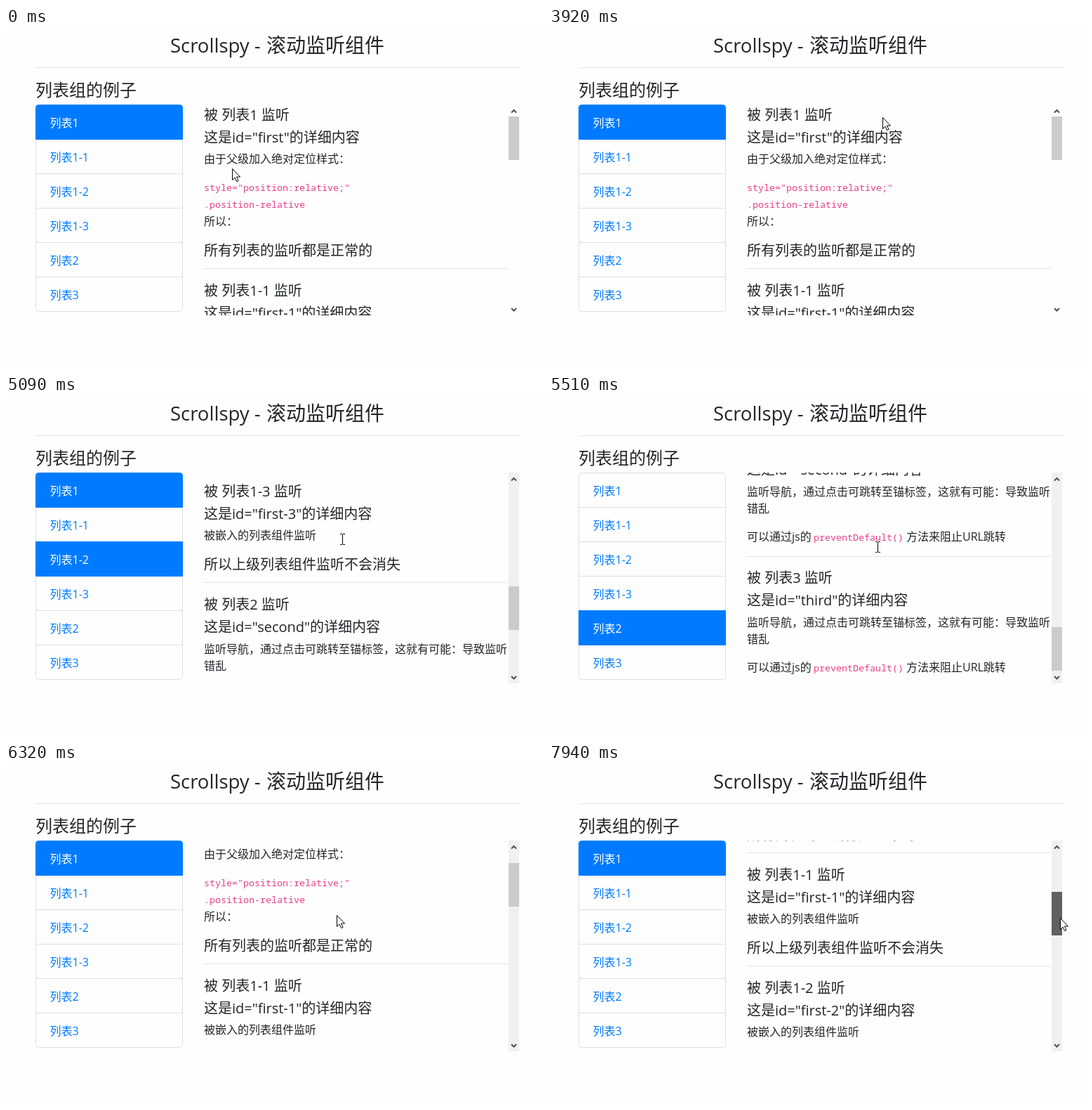
An HTML page that plays this animation: 765 px wide and 484 px high, repeating every 8 s.

```html
<!DOCTYPE html>
<html lang="zh-CN">
<head>
<meta charset="utf-8">
<title>Scrollspy</title>
<style>
html, body { margin: 0; width: 100%; height: 100%; overflow: hidden; background: #fefefe; }
svg { display: block; }
text { font-family: "Open Sans", "Noto Sans CJK SC", "Noto Sans CJK", sans-serif; fill: #212529; white-space: pre; }
.code { font-family: "Noto Sans Mono", monospace; fill: #e83e8c; }
.item path { fill: #fefefe; stroke: #dfdfdf; }
.item text { fill: #007bff; }
.item.active path { fill: #007bff; stroke: #007bff; }
.item.active text { fill: #fff; }
.rule { fill: #e4e4e4; }
.chevron { fill: none; stroke: #505050; stroke-width: 2; }
</style>
</head>
<body>
<svg id="stage" width="765" height="484" viewBox="0 0 765 484">
  <clipPath id="view"><rect x="281" y="109" width="435" height="300"/></clipPath>
  <rect class="rule" x="42" y="56" width="690" height="1"/>
  <g id="list"></g>
  <g clip-path="url(#view)"><g id="content"></g></g>
  <rect id="track" x="716" y="109" width="15" height="300"/>
  <path class="chevron" d="M720 120.500l3.500-3.500 3.500 3.500M720 399l3.500 3.500 3.500-3.500"/>
  <rect id="thumb" x="716" width="15" height="62"/>
  <path id="arrow" fill="#fff" stroke="#000" d="M.5.500V16.500L4 13l2.500 5.500 2.500-1-2.500-5.500h5z"/>
  <path id="beam" fill="none" stroke="#000" d="M-3-7.500h3m1 0h3M-3 7.500h3m1 0h3M.5-7v14"/>
</svg>
<script>
const $ = id => document.getElementById(id);
const list = $('list'), content = $('content');
const MAX_SCROLL = 787, TRAVEL = 204, GRAB_Y = 163;

function add(parent, tag, attrs) {
  const node = document.createElementNS('http://www.w3.org/2000/svg', tag);
  for (const key in attrs) node.setAttribute(key, attrs[key]);
  return parent.appendChild(node);
}

function write(parent, x, y, size, str) {
  add(parent, 'text', { x, y, 'font-size': size }).textContent = str;
}

function writeCode(x, y, str) {
  add(content, 'text', { x, y, 'font-size': 13.33, class: 'code' }).textContent = str;
}

write($('stage'), 234, 35, 27.5, 'Scrollspy -');
write($('stage'), 371, 35, 28, '滚动监听组件');
write($('stage'), 42, 97, 24, '列表组的例子');

// Navigation list
const names = ['1', '1-1', '1-2', '1-3', '2', '3'];
const items = names.map((name, i) => {
  const item = add(list, 'g', { class: 'item' });
  const y = 109.5 + 49 * i, a = i ? 0 : 4, b = i === 3 || i === 5 ? 4 : 0;
  add(item, 'path', {
    d: `M42.5 ${y + a}q0 ${-a} ${a} ${-a}H${251.5 - a}q${a} 0 ${a} ${a}` +
       `V${y + 49 - b}q0 ${b} ${-b} ${b}H${42.5 + b}q${-b} 0 ${-b} ${-b}z`
  });
  write(item, 62.5, 141 + 49 * i, 16, '列表' + name);
  return item;
});

// Scrolling sections, placed by the baseline of their heading
const ids = ['first', 'first-1', 'first-2', 'first-3', 'second', 'third'];
const baselines = [131, 381, 542, 703, 864, 1050];
baselines.forEach((y, i) => {
  const line = (dy, size, str, x = 282) => write(content, x, y + dy, size, str);
  const rule = dy => add(content, 'rect', { class: 'rule', x: 281, y: y + dy, width: 434, height: 1 });
  line(0, 20, `被 列表${names[i]} 监听`);
  line(32, 20, `这是id="${ids[i]}"的详细内容`);
  if (i === 0) {
    line(61, 16, '由于父级加入绝对定位样式：');
    writeCode(282, y + 101, 'style="position:relative;"');
    writeCode(282, y + 125, '.position-relative');
    line(150, 16, '所以：');
    line(193, 20, '所有列表的监听都是正常的');
    rule(211);
  } else if (i < 4) {
    line(61, 16, '被嵌入的列表组件监听');
    line(104, 20, '所以上级列表组件监听不会消失');
    rule(122);
  } else {
    line(62, 16, '监听导航，通过点击可跳转至锚标签，这就有可能：导致监听');
    line(86, 16, '错乱');
    line(126, 16, '可以通过js的');
    writeCode(377, y + 126, 'preventDefault()');
    line(126, 16, '方法来阻止URL跳转', 509);
    if (i === 4) rule(148);
  }
});

// [time, pointer, x, y, scroll]; while dragging, the pointer sets the scroll
const steps = [
  [0, 'arrow', 322, 200, 0],
  [120, 'arrow', 361, 88, 0],
  [270, 'none', 0, 0, 0],
  [3920, 'arrow', 475, 127, 0],
  [4450, 'arrow', 479, 131, 0],
  [4570, 'arrow', 482, 134, 0],
  [4720, 'beam', 488, 143, 37],
  [4840, 'beam', 489, 148, 137],
  [4970, 'beam', 486, 172, 330],
  [5090, 'beam', 479, 204, 560],
  [5210, 'beam', 473, 222, 730],
  [5350, 'beam', 466, 215, 730],
  [5510, 'beam', 468, 215, 784],
  [5650, 'arrow', 467, 215, 787],
  [5800, 'arrow', 468, 215, 787],
  [5950, 'arrow', 470, 215, 787],
  [6200, 'arrow', 471, 215, 341],
  [6320, 'arrow', 471, 215, 58],
  [6480, 'arrow', 471, 215, 0],
  [6740, 'arrow', 530, 207, 0],
  [6860, 'arrow', 630, 190, 0],
  [6980, 'arrow', 706, 178, 0],
  [7100, 'hover', 732, 173, 0],
  [7250, 'hover', 731, 167, 0],
  [7380, 'drag', 730, GRAB_Y],
  [7520, 'drag', 728, 200],
  [7670, 'drag', 728, 210],
  [7940, 'drag', 728, 219]
];

function activeItems(scroll) {
  if (scroll >= MAX_SCROLL) return [5];
  const current = baselines.filter(y => y - baselines[0] <= scroll + 10).length - 1;
  return current > 0 && current < 4 ? [0, current] : [current];
}

function render([time, pointer, x, y, wheel]) {
  const scroll = wheel ?? (y - GRAB_Y) * MAX_SCROLL / TRAVEL;
  content.setAttribute('transform', `translate(0 ${-Math.round(scroll)})`);
  $('thumb').setAttribute('y', 126 + Math.round(scroll * TRAVEL / MAX_SCROLL));
  $('thumb').setAttribute('fill', { hover: '#a8a8a8', drag: '#606060' }[pointer] || '#cbcbcb');
  $('track').setAttribute('fill', time < 4720 ? '#fefefe' : '#f0f0f0');

  const active = activeItems(scroll);
  items.forEach((item, i) => item.classList.toggle('active', active.includes(i)));
  list.append(...items, ...active.map(i => items[i]));

  const shape = pointer === 'hover' || pointer === 'drag' ? 'arrow' : pointer;
  for (const id of ['arrow', 'beam']) {
    $(id).setAttribute('transform', `translate(${x} ${y})`);
    $(id).style.display = id === shape ? '' : 'none';
  }
}

let shown;
function frame() {
  const t = performance.now() % 8000;
  const step = steps.findLast(s => s[0] <= t);
  if (step !== shown) render(shown = step);
  requestAnimationFrame(frame);
}
frame();
</script>
</body>
</html>
```
